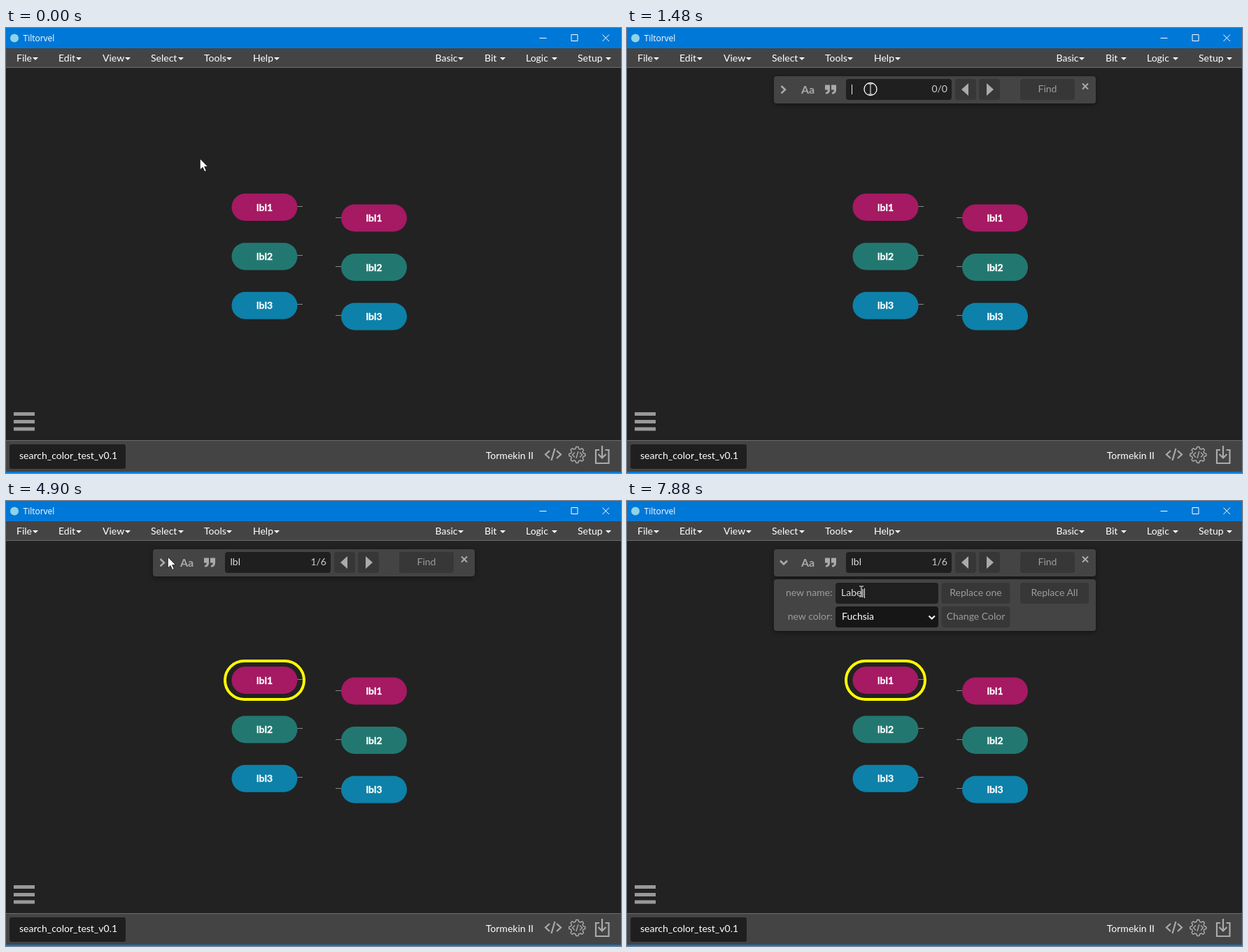
Recreate the animation shown at these times as an HTML page. Size 879 px wide and 637 px high, loop 8 s.

```html
<!DOCTYPE html>
<html lang="en">
<head>
<meta charset="utf-8">
<title>Search and replace</title>
<style>
  html, body { margin: 0; width: 100%; height: 100%; overflow: hidden; background: #222; }
  svg { display: block; width: 879px; height: 637px; font: 14px Lato, sans-serif; }
  .panel { fill: #444; filter: drop-shadow(0 2px 3px #0006); }
  .field { fill: #1f1f1f; }
  .button { fill: #373737; }
  .muted { fill: #9c9c9c; }
  .line { fill: none; stroke: #aaa; }
  .white { fill: none; stroke: #fff; }
  .middle { text-anchor: middle; }
  .end { text-anchor: end; }
</style>
</head>
<body>
<svg viewBox="0 0 879 637" fill="#fff">
  <rect width="879" height="637" fill="#222"/>

  <rect width="879" height="29" fill="#0078d7"/>
  <circle cx="12" cy="14.5" r="6" fill="#8fd3e8"/>
  <text x="24.5" y="19" style="font: 12px 'Open Sans', sans-serif">Tiltorvel</text>
  <path class="white" d="M762.5 14.5h10M808 9.5h9v9h-9zM852.5 9.5l9.500 9.500M862 9.500l-9.500 9.500"/>

  <rect y="29" width="879" height="27" fill="#444"/>
  <rect y="56" width="879" height="1" fill="#6c6c6c"/>
  <g id="menu"></g>

  <g id="blocks"></g>
  <rect id="highlight" x="313" y="229" width="113" height="55" rx="27.500" fill="none" stroke="#ff0" stroke-width="4"/>

  <path fill="#999" d="M11 550h30v5h-30zM11 561h30v5h-30zM11 571.500h30v5h-30z"/>
  <rect y="590" width="879" height="45" fill="#444"/>
  <rect y="590" width="879" height="1" fill="#6c6c6c"/>
  <rect y="635" width="879" height="2" fill="#0078d7"/>
  <rect x="5" y="596" width="166" height="35" rx="3" class="field"/>
  <text x="19" y="617">search_color_test_v0.1</text>
  <text x="754" y="617" class="end">Tormekin II</text>
  <g class="line" stroke-width="2.200">
    <path d="M777 605l-6 5.500 6 5.500M787 605l6 5.500-6 5.500M784.500 602l-5 17"/>
    <path id="gear" stroke-width="1.500"/>
    <path stroke-width="1.400" d="M813 607.500l-3.500 3.500 3.500 3.500M820 607.500l3.500 3.500-3.500 3.500M817.800 606l-2.800 10"/>
    <path d="M848 604h-5v19h18.500v-19h-5M852 598v17M846.500 610l5.500 5.500 5.500-5.500"/>
  </g>

  <g id="search">
    <rect x="210" y="69" width="460" height="39" rx="4" class="panel"/>
    <path id="chevron" class="line" stroke-width="2.600"/>
    <text x="249" y="94" font-size="16" font-weight="bold" fill="#aaa">Aa</text>
    <path id="quote" fill="#aaa" d="M283 81.500h7v7q0 6-6 6v-2.500q2.800 0 2.800-3.500h-3.800zM292 81.500h7v7q0 6-6 6v-2.500q2.800 0 2.800-3.500h-3.800z"/>
    <rect x="313" y="73" width="151" height="30" rx="4" class="field"/>
    <text id="query" x="320.500" y="92" fill="#ddd"></text>
    <text id="count" x="458" y="92" class="end" fill="#ccc"></text>
    <g id="searchButtons"></g>
    <path fill="#aaa" d="M488 79v18l-10-9zM514 79v18l10-9z"/>
    <path class="line" stroke-width="2" d="M651 79.500l8 8M659 79.500l-8 8"/>
  </g>

  <g id="replace">
    <rect x="210" y="112" width="460" height="74" rx="4" class="panel"/>
    <text x="293.500" y="136" class="end muted">new name:</text>
    <text x="293.500" y="170" class="end muted">new color:</text>
    <rect x="298" y="117" width="147" height="30" rx="4" class="field"/>
    <rect x="298" y="151" width="147" height="30" rx="4" fill="#161616"/>
    <text x="306" y="136" id="name" fill="#ddd"></text>
    <text x="307" y="170">Fuchsia</text>
    <path class="white" stroke-width="2" d="M431.500 164.500l4.200 4 4.200-4"/>
    <g id="replaceButtons"></g>
  </g>

  <rect id="caret" width="1" height="14" fill="#eee"/>
  <g id="cursor">
    <circle id="ring" r="9" class="white" stroke-width="1.300"/>
    <path id="arrow" stroke="#111" stroke-width=".8" d="M.3 0v16l3.800-3.500 2.700 6 2.500-1.200-2.700-5.700h5z"/>
    <path id="beam" class="white" d="M-3 -7.500h2.500l.5.500.500-.500h2.500M0 -7v14M-3 7.500h2.500l.500-.500.500.500h2.500"/>
  </g>
</svg>
<script>
const $ = id => document.getElementById(id);
const show = (id, on) => $(id).setAttribute('visibility', on ? 'visible' : 'hidden');

// Label, text x, dropdown triangle x
$('menu').innerHTML = [
  ['File', 15, 38], ['Edit', 75, 100], ['View', 138, 170], ['Select', 207, 246],
  ['Tools', 283, 315], ['Help', 353, 383], ['Basic', 613.5, 646], ['Bit', 684, 706],
  ['Logic', 743, 780], ['Setup', 817, 857]
].map(([label, x, tri]) =>
  `<text x="${x}" y="48">${label}</text><path d="M${tri} 42h8l-4 4z"/>`).join('');

const pill = (x, y, color, label) => `
  <rect x="${x}" y="${y}" width="94" height="39" rx="19.5" fill="${color}"/>
  <text x="${x + 47}" y="${y + 24.5}" class="middle" font-weight="bold"
    stroke="#fff" stroke-width=".3">${label}</text>`;

$('blocks').innerHTML = ['#a61963', '#227870', '#0d81a9'].map((color, i) => {
  const y = 237 + i * 70.4, label = 'lbl' + (i + 1), wire = Math.floor(y + 18) + .5;
  return `<path stroke="#888" d="M416 ${wire}h8M471 ${wire + 16}h8"/>`
    + pill(322.5, y, color, label) + pill(479, y + 15.6, color, label);
}).join('');

const button = (x, y, width, label = '') => `
  <rect x="${x}" y="${y}" width="${width}" height="30" rx="4" class="button"/>
  <text x="${x + width / 2}" y="${y + 19}" class="middle muted">${label}</text>`;
$('searchButtons').innerHTML = button(469, 73, 30) + button(503, 73, 30) + button(562, 73, 78, 'Find');
$('replaceButtons').innerHTML = button(449.5, 117, 98, 'Replace one')
  + button(562, 117, 98, 'Replace All') + button(449.5, 151, 98, 'Change Color');

// Eight-lobed gear outline
$('gear').setAttribute('d', 'M' + Array.from({ length: 96 }, (_, i) => {
  const a = i / 48 * Math.PI, r = 10.3 + 1.3 * Math.tanh(3 * Math.cos(8 * a));
  return `${(816.3 + r * Math.cos(a)).toFixed(2)} ${(611 + r * Math.sin(a)).toFixed(2)}`;
}).join('L') + 'z');

const LOOP = 8000, OPEN = 5180;
const moves = [
  { from: 0, to: 1, path: [[277, 187]] },
  { from: 740, to: 1480, path: [[275, 182], [266, 166], [250, 145], [233, 124], [221, 104],
    [240, 92], [290, 87], [335, 88], [348, 87.5]] },
  { from: 4040, to: 4140, path: [[353, 90], [362, 95]] },
  { from: 4330, to: 5080, path: [[355, 95], [310, 95], [262, 95], [222, 95], [196, 93],
    [208, 86], [231, 80], [226, 86], [224, 88]] },
  { from: 5180, to: 5930, path: [[224, 88], [224, 88], [232, 92], [252, 103], [280, 117],
    [308, 127], [327, 130], [334, 129], [335, 129.5]] }
];
const clicks = [[1480, 1670], [5080, 5270], [6130, 6230]];
const queryCaret = [[360, 1020], [1480, 1860], [2420, 3750]];
const nameCaret = [[6130, 6810], [7190, LOOP]];
const queryKeys = [2420, 2890, 3270];
const nameKeys = [7190, 7490, 7580, 7680, 7880];

const within = (t, spans) => spans.some(([a, b]) => t >= a && t < b);
const typed = (t, word, keys) => word.slice(0, keys.filter(k => t >= k).length);

function cursorAt(t) {
  const { from, to, path } = moves.filter(m => t >= m.from).pop();
  const last = path.length - 1;
  return path[Math.min(last, Math.floor((t - from) / (to - from) * last + .06))];
}

function draw(t) {
  const open = t >= OPEN, found = t >= 2510;
  $('search').setAttribute('opacity', t < 360 ? 0 : t < 450 ? .4 : t < 540 ? .85 : 1);
  show('replace', open);
  show('highlight', found);
  $('chevron').setAttribute('d', open ? 'M219 85.500l5 5 5-5' : 'M220.500 83l5.500 5.200-5.500 5.200');
  $('query').textContent = typed(t, 'lbl', queryKeys);
  $('count').textContent = found ? '1/6' : '0/0';
  $('name').textContent = typed(t, 'Label', nameKeys);

  const inName = t >= 6130, field = $(inName ? 'name' : 'query');
  const start = inName ? 306 : 320.5;
  show('caret', within(t, inName ? nameCaret : queryCaret));
  $('caret').setAttribute('x', Math.round(start + field.getComputedTextLength()));
  $('caret').setAttribute('y', inName ? 125 : 81);

  const [x, y] = cursorAt(t);
  const overField = x > 313 && x < 464 && y > 73 && y < 103
    || open && x > 298 && x < 445 && y > 117 && y < 147;
  $('cursor').setAttribute('transform', `translate(${x} ${y})`);
  show('arrow', !overField);
  show('beam', overField);
  show('ring', within(t, clicks));
}

const began = performance.now();
function tick() {
  draw((performance.now() - began) % LOOP);
  requestAnimationFrame(tick);
}
tick();
</script>
</body>
</html>
```
